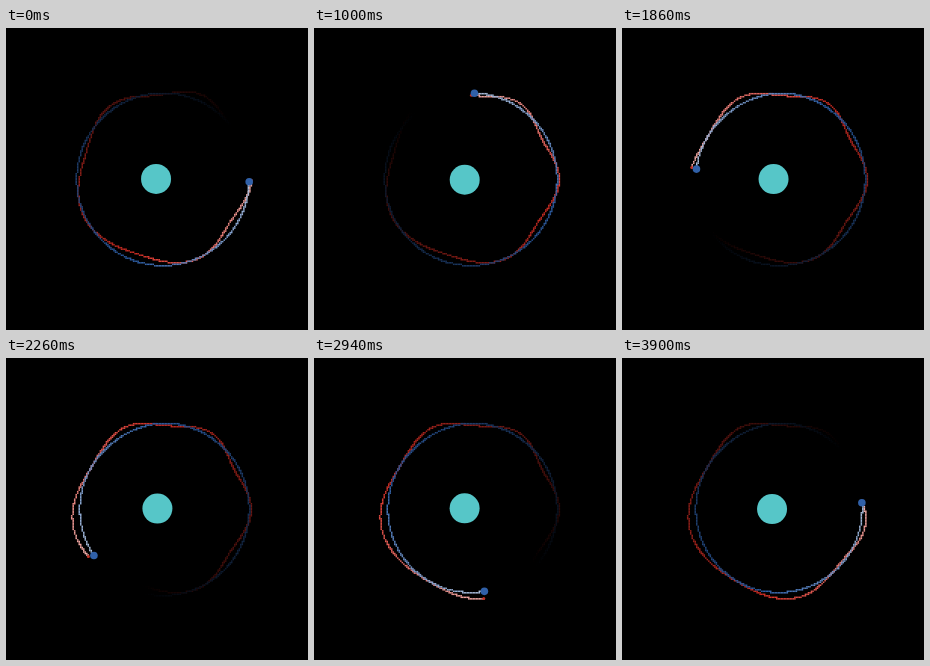
Write an HTML page with a canvas that moves like this. It is 302 px wide and 302 px high and loops after 3920 ms.

```html
<!DOCTYPE html>
<html>
<head>
<meta charset="utf-8">
<style>
html, body { margin: 0; width: 100%; height: 100%; overflow: hidden; background: #000; }
canvas { display: block; }
</style>
</head>
<body>
<canvas id="stage" width="302" height="302"></canvas>
<script>
const ctx = document.getElementById('stage').getContext('2d');
const LOOP = 3920, STEP = 20, YEAR = 3830, TRAIL = 3400;
const CX = 150.5, CY = 151.3, CELL = 302 / 200;
const RED = [218, 48, 38], BLUE = [48, 98, 172];

const sin = deg => Math.sin(deg * Math.PI / 180);
const cos = deg => Math.cos(deg * Math.PI / 180);
const clamp = v => Math.min(1, Math.max(0, v));
const smooth = v => (v = clamp(v)) * v * (3 - 2 * v);
const polar = (a, r) => [CX + r * cos(a), CY - r * sin(a)];

// Planet angle in degrees: slower on the right, faster on the left
function angle(t) {
  const m = 360 * t / YEAR;
  return m - 1.5 - 9 * sin(m) + .8 * sin(2 * m);
}

// Off-centre circle that tightens during the second turn
const orbit = a => 6.5 * cos(a) + Math.hypot(86, 6.5 * cos(a)) - 3.1 * smooth((a - 75) / 55);

// Moon distance from the orbit: a slow beat plus about five waves a turn
function swing(a) {
  const phase = 1.03 * a + 18 * sin(a - 35) - 61;
  return .5 + 4 * sin(.6 * (a - 60)) + 3.8 * cos(5 * phase);
}

const planetAt = t => polar(angle(t), orbit(angle(t)));
function moonAt(t) {
  const a = angle(t) + 2 * cos(angle(t) - 60);
  return polar(a, orbit(a) + swing(a));
}

// Pale at the head, full colour after a third, black at the tail
function shade(base, age) {
  const pale = .62 * clamp(1 - age / .35), dim = clamp((1 - age) / .7);
  return `rgb(${base.map(c => Math.round((c + (255 - c) * pale) * dim))})`;
}

function trail(at, base, now) {
  let last;
  for (let back = TRAIL; back >= 0; back -= 5) {
    const [col, row] = at(now - back).map(v => Math.floor(v / CELL));
    const key = col + ',' + row;
    if (key === last) continue;
    last = key;
    ctx.fillStyle = shade(base, back / TRAIL);
    ctx.fillRect(col * CELL, row * CELL, CELL, CELL);
  }
}

function disc([x, y], r, color) {
  ctx.fillStyle = color;
  ctx.beginPath();
  ctx.arc(x, y, r, 0, 7);
  ctx.fill();
}

function draw() {
  const t = Math.floor(performance.now() % LOOP / STEP) * STEP;
  ctx.fillStyle = '#000';
  ctx.fillRect(0, 0, 302, 302);
  trail(moonAt, RED, t);
  trail(planetAt, BLUE, t);
  // The star wobbles opposite the planet
  const a = angle(t);
  disc([150.8 - .75 * cos(a), 151 + .75 * sin(a)], 15, '#56c6c8');
  disc(moonAt(t), 1.5, '#c03024');
  disc(planetAt(t), 3.8, '#3060a8');
  requestAnimationFrame(draw);
}
draw();
</script>
</body>
</html>
```
